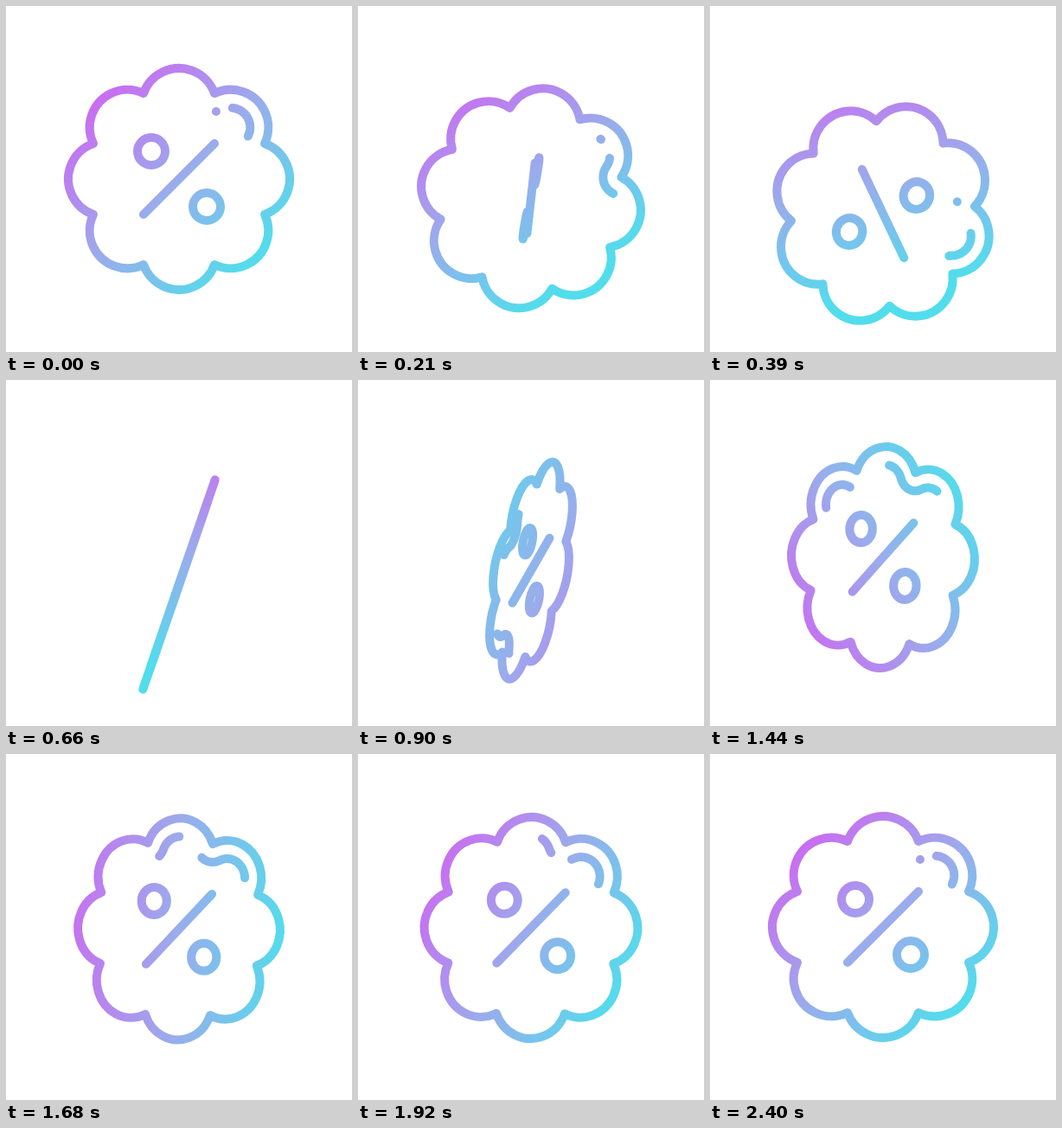
Recreate the animation shown at these times as an HTML page with a canvas. Size 400 by 400 pixels, loop 4.43 s.

```html
<!DOCTYPE html>
<html lang="en">
<head>
<meta charset="utf-8">
<title>Discount badge</title>
<style>
  html, body { margin: 0; width: 100%; height: 100%; overflow: hidden; background: #fff; }
  canvas { display: block; width: 400px; height: 400px; }
</style>
</head>
<body>
<canvas id="stage"></canvas>
<script>
const LOOP = 4430, STEP = 30, MOVE = 2400;
const RAD = Math.PI / 180;
const LOBE_DIST = 84.5, LOBE_R = 43.5, LOBE_HALF = 70.5;
const NOTCH_DIST = 107.15, SHINE_R = 22.5, ARC_PART = 0.643;

const canvas = document.getElementById('stage');
const ctx = canvas.getContext('2d');
const dpr = window.devicePixelRatio || 1;
canvas.width = canvas.height = 400 * dpr;

// Smooth monotone curve through [time, value] pairs, at rest at both ends.
function track(...keys) {
  const last = keys.length - 1;
  const slope = i => (keys[i + 1][1] - keys[i][1]) / (keys[i + 1][0] - keys[i][0]);
  const tangent = keys.map((_, i) => {
    if (i === 0 || i === last) return 0;
    const a = slope(i - 1), b = slope(i);
    return a * b > 0 ? 2 * a * b / (a + b) : 0;
  });
  return t => {
    if (t <= keys[0][0]) return keys[0][1];
    if (t >= keys[last][0]) return keys[last][1];
    let i = 0;
    while (t >= keys[i + 1][0]) i++;
    const [t0, v0] = keys[i], [t1, v1] = keys[i + 1];
    const h = t1 - t0, x = (t - t0) / h, r = 1 - x;
    return v0 * r * r * (1 + 2 * x) + v1 * x * x * (3 - 2 * x)
      + h * x * r * (tangent[i] * r - tangent[i + 1] * x);
  };
}

const drop = track([0, 0], [390, 40], [480, 40], [660, 36.5], [900, 20.3], [1080, 13],
  [1440, 5], [1620, 2.9], [1920, 1], [MOVE, 0]);
const tilt = track([0, 0], [390, 18.2], [520, 19.4], [660, 19], [900, 11.6], [1080, 7.3],
  [1440, 2], [1920, 0.3], [MOVE, 0]);
const hue = track([0, 45], [390, 76], [660, 125], [900, 204], [1440, 325], [1920, 388], [MOVE, 405]);

// Horizontal scale: the percent sign flips first, then the whole badge flips.
const signFlip = track([0, 1], [390, -0.96], [480, -1]);
const badgeFlip = track([330, 1], [390, 0.99], [570, 0.6], [660, 0], [900, -0.33], [1080, -0.57],
  [1440, -0.828], [1920, -0.964], [MOVE, -1]);

// Both ends of each shine stroke, counted in lobes around the badge.
const shineKeys = (...v) => track(...[0, 390, 900, 1440, 1920, MOVE].map((t, i) => [t, v[i]]));
const shines = [
  [shineKeys(2.925, 3.75, 6.55, 9.06, 10.48, 10.925), shineKeys(2.925, 3.75, 7.25, 9.65, 10.7, 10.925)],
  [shineKeys(3.14, 4.2, 8.46, 10.37, 10.98, 11.14), shineKeys(3.65, 4.68, 9.13, 11.27, 11.63, 11.65)]
];

const polar = (deg, r) => [r * Math.cos(deg * RAD), r * Math.sin(deg * RAD)];

// Point on the wavy line that runs inside the outline.
function shineAt(u) {
  const k = Math.floor(u), f = u - k, out = 180 + 45 * k;
  const onLobe = f < ARC_PART;
  const q = onLobe ? f / ARC_PART : (f - ARC_PART) / (1 - ARC_PART);
  const [cx, cy] = onLobe ? polar(out, LOBE_DIST) : polar(out + 22.5, NOTCH_DIST);
  const [dx, dy] = onLobe
    ? polar(out + LOBE_HALF * (2 * q - 1), SHINE_R)
    : polar(out + 22.5 + 228 - 96 * q, LOBE_R - SHINE_R);
  return [cx + dx, cy + dy];
}

// The colours turn around the badge and slide back by the distance it dropped.
function gradient(deg, y) {
  const [x0, y0] = polar(deg, -130 - y), [x1, y1] = polar(deg, 130 - y);
  const g = ctx.createLinearGradient(200 + x0, 200 + y + y0, 200 + x1, 200 + y + y1);
  g.addColorStop(0, '#c86ef0');
  g.addColorStop(0.5, '#9aacec');
  g.addColorStop(1, '#52ddec');
  return g;
}

function traceBadge() {
  ctx.moveTo(...shineless(-LOBE_HALF));
  for (let k = 0; k < 8; k++) {
    const out = 45 * k, [x, y] = polar(out, LOBE_DIST);
    ctx.arc(x, y, LOBE_R, (out - LOBE_HALF) * RAD, (out + LOBE_HALF) * RAD);
  }
  ctx.closePath();
}

// Point on the rim of the right-hand lobe.
function shineless(deg) {
  const [x, y] = polar(deg, LOBE_R);
  return [LOBE_DIST + x, y];
}

function tracePercent() {
  ctx.moveTo(-41, 41);
  ctx.lineTo(41, -41);
  for (const c of [-32, 32]) {
    ctx.moveTo(c + 16, c);
    ctx.arc(c, c, 16, 0, 2 * Math.PI);
    ctx.closePath();
  }
}

function traceShine(from, to) {
  const n = Math.max(1, Math.ceil((to - from) * 50));
  ctx.moveTo(...shineAt(from));
  for (let i = 1; i <= n; i++) {
    const [x, y] = shineAt(from + (to - from) * i / n);
    ctx.lineTo(x + 0.01, y);
  }
}

// Adds a part under a horizontal scale, kept just off zero so it stays drawable.
function part(scale, trace) {
  ctx.save();
  ctx.scale(Math.abs(scale) < 0.003 ? 0.003 : scale, 1);
  trace();
  ctx.restore();
}

function draw(t) {
  const y = drop(t), flip = badgeFlip(t);
  ctx.setTransform(dpr, 0, 0, dpr, 0, 0);
  ctx.fillStyle = '#fff';
  ctx.fillRect(0, 0, 400, 400);

  ctx.beginPath();
  ctx.save();
  ctx.translate(200, 200 + y);
  ctx.rotate(tilt(t) * RAD);
  part(flip, traceBadge);
  part(flip * signFlip(t), tracePercent);
  part(Math.abs(flip), () => shines.forEach(([from, to]) => traceShine(from(t), to(t))));
  ctx.restore();

  ctx.lineWidth = 10;
  ctx.lineCap = ctx.lineJoin = 'round';
  ctx.strokeStyle = gradient(hue(t), y);
  ctx.stroke();
}

const start = performance.now();
function tick() {
  const t = (performance.now() - start) % LOOP;
  draw(Math.min(MOVE, Math.floor(t / STEP) * STEP));
  requestAnimationFrame(tick);
}
tick();
</script>
</body>
</html>
```
